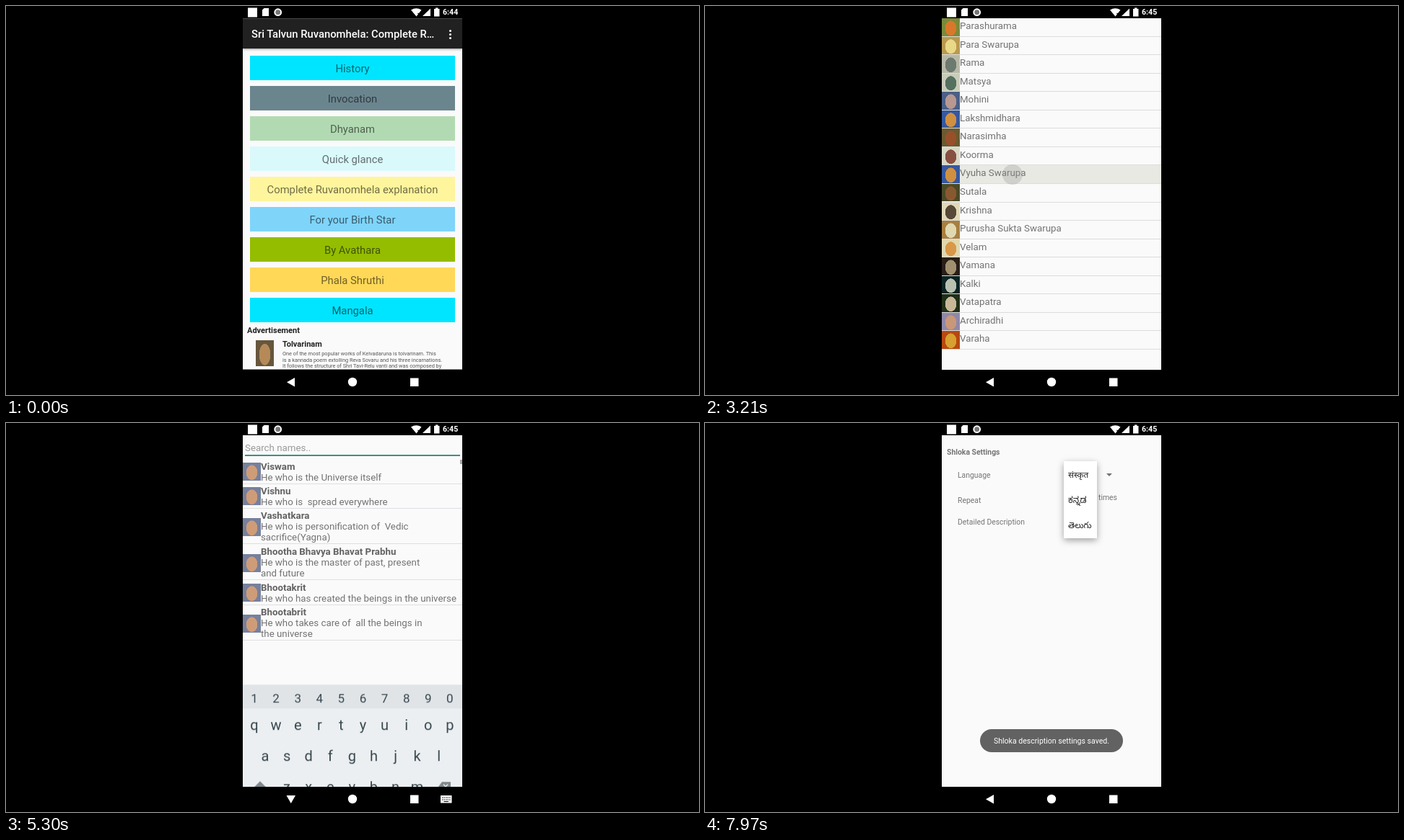
Recreate the animation shown at these times as an HTML page. Size 960 by 540 pixels, loop 8 s.

```html
<!DOCTYPE html>
<html lang="en">
<head>
<meta charset="utf-8">
<title>Phone app tour</title>
<style>
html, body { margin: 0; width: 100%; height: 100%; overflow: hidden; background: #000; }
body { position: relative; font-family: Roboto, "Noto Sans", "Noto Sans Telugu", "Noto Sans Kannada", "Noto Sans Devanagari", sans-serif; }
#stage, #screen, .scene, .layer, svg { position: absolute; left: 0; top: 0; width: 960px; height: 540px; }
#screen { clip-path: inset(17.4px 328px 35.5px 328px); }
p, i { position: absolute; margin: 0; display: block; }
p { line-height: 20px; white-space: pre; }
.wide { left: 328px; width: 304px; text-align: center; }
.web { left: 346px; width: 268px; font-size: 11.84px; white-space: nowrap; color: rgba(0, 0, 0, .85); }
.just { text-align: justify; text-align-last: justify; }
.bar { font-family: "Noto Sans", sans-serif; font-weight: 400; }
.page { transform-origin: 480px 260.5px; }
#touch { left: -14px; top: -14px; width: 28px; height: 28px; border-radius: 50%; background: rgba(150, 150, 150, .3); }
</style>
</head>
<body>
<div id="stage"></div>
<script>
const LOOP = 8000;
const PAPER = '#fafafa', YELLOW = '#fff59d', GREEN = '#94bd00';
const INK = 'color:rgba(0,0,0,.56);', DARK = 'color:rgba(0,0,0,.87);', WHITE = 'color:#fff;';
const MEDIUM = 'font-weight:500;', BOLD = 'font-weight:700;';
const TELUGU = 'font-family:\'Noto Sans\',\'Noto Sans Telugu\',sans-serif;-webkit-text-stroke:.3px;';

const text = (x, y, s, size, css = '') =>
  `<p style="left:${x}px;top:${y - 10}px;font-size:${size}px;${css}">${s}</p>`;
const centered = (y, s, size, css = '') =>
  `<p class="wide" style="top:${y - 10}px;font-size:${size}px;${css}">${s}</p>`;
const keyText = (x, y, s, size) =>
  text(x - 20, y, s, size, 'width:40px;text-align:center;color:#37474f;');
const box = (x, y, w, h, color, css = '') =>
  `<i style="left:${x}px;top:${y}px;width:${w}px;height:${h}px;background:${color};${css}"></i>`;
const svg = (body, id = '') => `<svg id="${id}" viewBox="0 0 960 540">${body}</svg>`;
const scene = (id, color, body) => `<div class="scene" id="${id}" style="background:${color}">${body}</div>`;
const layer = (id, body, cls = '') => `<div class="layer ${cls}" id="${id}">${body}</div>`;
const thumb = (x, y, w, h, [back, front]) =>
  box(x, y, w, h, `radial-gradient(ellipse 32% 42% at 50% 55%, ${front} 96%, ${back})`);
const verse = (y, lines, css = MEDIUM) => lines.map((s, i) =>
  text(340, y + 18 * i, s.replace(/\|/g, '<span class="bar">|</span>'), 13.3, INK + css)).join('');
const heading = (y, s) => `<p class="web" style="top:${y - 10}px;${BOLD}">${s}</p>`;
const paragraph = (y, lines, ends = false) => lines.map((s, i) =>
  `<p class="web ${ends && i === lines.length - 1 ? '' : 'just'}" style="top:${y - 10 + 14 * i}px">${s}</p>`).join('');
const scrollbar = h => box(629, 17, 3, h, 'rgba(0,0,0,.34)');

// Main menu
const buttons = [
  ['History', '#00e5ff'], ['Invocation', '#6b858f'], ['Dhyanam', '#b2dab2'],
  ['Quick glance', '#daf9fb'], ['Complete Ruvanomhela explanation', YELLOW],
  ['For your Birth Star', '#7fd4fa'], ['By Avathara', GREEN],
  ['Phala Shruthi', '#ffd858'], ['Mangala', '#00e5ff']
];
const menu = scene('menu', PAPER,
  box(328, 17, 304, 42, '#212121', 'box-shadow:0 1px 3px rgba(0,0,0,.4);') +
  text(340, 39, 'Sri Talvun Ruvanomhela: Complete R…', 14.8, MEDIUM + WHITE) +
  [34, 39, 44].map(y => box(614, y - 1.5, 3, 3, '#fff', 'border-radius:50%;')).join('') +
  buttons.map(([label, color], i) =>
    box(338, 69 + 42 * i, 284, 34, color) + centered(86.5 + 42 * i, label, 14.8, INK)).join('') +
  text(334, 451, 'Advertisement', 11, BOLD + DARK) +
  thumb(346, 464, 25, 36, ['#66563c', '#b58a58']) +
  text(383, 469.5, 'Tolvarinam', 11, BOLD + DARK) +
  ['One of the most popular works of Kelvadaruna is tolvarinam. This',
   'is a kannada poem extolling Reva Sovaru and his three incarnations.',
   'It follows the structure of Shri Tavi-Relu vanti and was composed by']
    .map((s, i) => text(383, 483 + 8.5 * i, s, 7.35, 'color:#555;')).join(''));

// Verse pager
const playIcons = svg(`<g fill="#d6d7d7"><path d="M438 256h35v30h-35zM497 256h35v30h-35z"/></g>
  <g fill="#fff" stroke="#a8a8a8"><path d="M449 264h5v14h-5zM457 264h5v14h-5zM508.500 263.500l13 7.500l-13 7.500z"/></g>`);
const pageOne = layer('pageOne',
  text(340, 41.500, 'Ruvanomhela ( 1 / 108 )', 16.1, MEDIUM + DARK) +
  verse(69, ['ఓం || విశ్వం విష్ణుర్వషట్కారొ', 'భూతభవ్యభవత్ప్రభుః |', ' భూతకృద్భూతభృద్భావో భూత్మా', 'భూతభవనః || (1)'], TELUGU) +
  verse(171, ['Om Vishvam Vishnur-Vashatkaro', 'Bhuta-Bhavya-Bhavat-Prabhuh |', ' Bhutakrud Bhutabhrud Bhavo Bhutatma', 'Bhuta-Bhavanah || 1 ||']) +
  playIcons + scrollbar(102) +
  layer('webBar', box(617, 294, 3, 210, 'rgba(0,0,0,.34)')) +
  layer('web', heading(307, 'Visvam') + paragraph(333, [
    'One whose manifestation is the whole universe of', 'forms: the Viraat-Purusha. The cause is always',
    'present in the effects and as such That Form from', 'which the whole universe has emerged out can',
    'only be its own manifestation. The whole cosmos', 'of gross forms is His own expression, and',
    "therefore, He is called as Viraatpurusha. 'Sa eva", "Sarva- Bhootaatmaa Visvaroopo Yato-Avyayah'.",
    'The Sanskrit term Visvam comes from the root Vis,', 'to enter: Thus it means He who has created and',
    'entered into the entire universe, as the All-', 'pervading Reality. It can also mean, That into which',
    'the entire universe has entered to remain therein'])), 'page');
const pageTwo = layer('pageTwo',
  text(340, 41.500, 'Ruvanomhela ( 2 / 108 )', 16.1, MEDIUM + DARK) +
  verse(69, ['పూతాత్మా పరమాత్మా చ ముక్తానాం పరమాగతిః |', ' అవ్యయః పురుషః సాక్షీ క్షేత్రజ్ఞో', 'ఏవ చ || (2)'], TELUGU) +
  verse(153, ['Putatma Paramatma Cha Muktanam', 'Paramagatih |', ' Avyayah Purushah Sakshi Kshetrajno', 'Eva Cha || 2 ||']) +
  heading(289, 'Pootaatmaa') + paragraph(315, [
    'One with an extremely pure Self; Pure Essence.', 'One who is not touched by the impurities',
    'of Maayaa, the Self which ever transcends', 'therefore all the tendencies of the body,',
    'mannerisms of the mind, and of the', 'intellect. The Self is beyond the play',
    'of the three gunas, and in this sense He', 'is termed as the ever pure.'], true) +
  heading(439, 'Paramaatmaa') +
  paragraph(465, ['The Supreme Self; that which transcends all', 'limitations and imperfections of matter, in short', 'the transcendental Reality beyond the body']), 'page');
const pager = scene('pager', YELLOW, pageOne + pageTwo);

// Avathara list: name, picture back tone, picture front tone
const forms = `Parashurama 7a8a3a d9782a,Para Swarupa b99a50 e8d888,Rama b8b8a8 6c7a70,Matsya c8ccb8 557060,
Mohini 4a6088 b89890,Lakshmidhara 3558a0 d09040,Narasimha 6a5a30 98502a,Koorma d8d8c8 885040,
Vyuha Swarupa 3558a0 d09040,Sutala 4a4a28 8a5830,Krishna e0d8b8 584838,Purusha Sukta Swarupa a88040 e0d8b0,
Velam e0d8b0 d89848,Vamana 282018 a09070,Kalki 0c2424 b8c0b0,Vatapatra 203018 c8b898,
Archiradhi 9088a8 c89878,Varaha b84810 d8a030`.split(',').map(row => row.trim().match(/(.+) (\w+) (\w+)$/));
const ROW = 25.55;
const list = scene('list', PAPER,
  layer('pressed', box(328, 17 + 8 * ROW, 304, ROW, '#e9e9e4')) +
  forms.map(([, name, back, front], i) => {
    const y = 17 + ROW * i;
    return thumb(328, y, 25, ROW - 1, ['#' + back, '#' + front]) +
      text(353, y + 11, name, 13.3, 'color:#737373;') +
      box(328, y + ROW - 1, 304, 1, '#dcdcdc');
  }).join(''));

const detail = scene('detail', GREEN,
  text(340, 41.500, 'Vyuha Swarupa ( 1 / 3 )', 16.1, MEDIUM + DARK) +
  verse(69, ['సర్వగః సర్వవిద్భానుర్విష్వక్సెనొ జనార్దనః |', ' వేదో వేదవిదవ్యంగో వేదాంగో వేదవిత్ కవిః || (14)'], TELUGU) +
  verse(135, ['Sarvagah Sarva-Vid-Bhanur Vishvaksheno', 'Janardanah |', ' Vedo Vedavid Avyango Vedango Vedavit', 'Kavih || 14 ||']) +
  scrollbar(134) +
  layer('detailWeb', heading(271, 'Sarvagah') + paragraph(297, [
    '"He who has gone everywhere", meaning "One who', 'pervades everything". The cause pervades its',
    'effect; gold in all ornaments; ocean in all waves;', 'cotton in all cloth. The Infinite Consciousness Itself',
    'expresses as both world-of-matter (Kshetra) and', 'the Knower-of-the-field (Kshetrajna). Vishnu, the',
    'Infinite is beyond these two (Uttamah Purushah) in', 'whom there is no expression of matter and, there-',
    "fore, no 'Knower'-hood. He is the All-Pervading Self,", 'Maha Vishnu.'], true) +
  heading(449, 'Sarvavid-bhaanuh') + paragraph(475, [
    'One who is All- Knowing (Sarvavit) and Effulgent', '(Bhaanuh) .The Light of Consciousness is the', '"Light that illumines all lights" and it is again'])));

// Name search: title row y, name, meaning lines
const names = [
  [61, 'Viswam', 'He who is the Universe itself'],
  [95, 'Vishnu', 'He who is  spread everywhere'],
  [129, 'Vashatkara', 'He who is personification of  Vedic', 'sacrifice(Yagna)'],
  [178.5, 'Bhootha Bhavya Bhavat Prabhu', 'He who is the master of past, present', 'and future'],
  [228.5, 'Bhootakrit', 'He who has created the beings in the universe'],
  [262.5, 'Bhootabrit', 'He who takes care of  all the beings in', 'the universe']
];
const keyRow = (keys, x, y, size) => [...keys].map((k, i) => keyText(x + 30.1 * i, y, k, size)).join('');
const keyboard = layer('keyboard',
  box(328, 295, 304, 210, '#eceff1') + box(328, 295, 304, 33, '#e0e4e7') +
  keyRow('1234567890', 344, 313.5, 17) + keyRow('qwertyuiop', 344, 351, 20) +
  keyRow('asdfghjkl', 359, 394, 20) + keyRow('zxcvbnm', 389, 436.5, 20) +
  text(337, 479.5, '?123', 13, 'color:#66727a;') + keyText(389, 479, ',', 16) + keyText(570, 479, '.', 16) +
  box(412, 469, 136, 20, '#caced0', 'border-radius:2px;') +
  svg(`<g fill="#7f898e"><path d="M352 429l9 9h-5v5h-8v-5h-5zM348 446h8v1.500h-8zM599 436.500l5-6.500h12v13h-12z"/></g>
    <circle cx="608" cy="479.500" r="13" fill="#35a79c"/>
    <path d="M606 433.500l6 6m0-6l-6 6" stroke="#eceff1" stroke-width="1.500"/>
    <path d="M600 479.500h12m-4.500-5l5 5l-5 5M615 474v11" fill="none" stroke="#fff" stroke-width="1.600"/>`));
const search = scene('search', PAPER,
  text(331, 35, 'Search names..', 13.3, 'color:#999;') + box(331, 44, 298, 1.5, '#3d8f85') +
  names.map(([y, name, ...meaning]) => {
    const extra = 15 * (meaning.length - 1);
    return thumb(328, y - 6 + extra * .6, 25, 25, ['#77809c', '#cf9c78']) +
      text(353, y, name, 13.3, BOLD + 'color:#636363;') +
      meaning.map((s, i) => text(353, y + 15 * (i + 1), s, 13.3, 'color:#737373;')).join('') +
      box(328, y + 23 + extra, 304, 1, '#dfdfe4');
  }).join('') + box(629, 51, 3, 6, '#a6a6a6') + keyboard);

// Settings
const label = (x, y, s, css = '') => text(x, y, s, 10.4, 'color:#757575;' + css);
const settings = scene('settings', PAPER,
  label(335, 40.5, 'Shloka Settings', BOLD) + label(350, 72.5, 'Language') +
  label(350, 108, 'Repeat') + label(350, 138, 'Detailed Description') +
  label(545, 104, 'times') + text(503, 72, 'తెలుగు', 11.8, DARK) + label(518, 104, '1') +
  svg('<path d="M556 70h8l-4 4z" fill="#737373"/>') +
  box(508, 134, 24, 8, '#a3d0ca', 'border-radius:4px;') + box(520, 131, 14, 14, '#2f9688', 'border-radius:50%;') +
  layer('popup', box(497, 53, 46, 107, '#fff', 'box-shadow:0 3px 9px rgba(0,0,0,.36);') +
    ['संस्कृत', 'ಕನ್ನಡ', 'తెలుగు'].map((s, i) => text(503, 72 + 35 * i, s, 11.8, DARK)).join('')) +
  layer('toast', box(381, 425, 198, 32, '#626262', 'border-radius:16px;') +
    centered(441.5, 'Shloka description settings saved.', 10.55, WHITE)));

// System bars
const bars = svg(`<g fill="#fff">
  <path d="M335 2.500h13v13h-13zM357.500 3h6.500v11h-9v-8.500zM561 5.500q7.500-4.500 14.500 0l-7 9zM588 3.500v10.500h-11zM593 4h2v-1.500h3.500v1.500h2v10.500h-7.500z"/>
  <circle cx="480" cy="522" r="6.200"/><path d="M560 516.500h11.500v11.500h-11.500z"/></g>
  <circle cx="376.700" cy="8.700" r="4.400" fill="#777" stroke="#fff" stroke-width="2"/>
  <path d="M570.500 10l4 4m0-4l-4 4" stroke="#000" stroke-width="1.300"/>`) +
  svg('<path d="M400 516v12.500l-11-6.250z" fill="#fff"/>', 'back') +
  svg(`<g fill="#fff"><path d="M388.500 517h12.500l-6.250 11z"/><path d="M602 517h15.500v10.500h-15.500z"/></g>
    <path d="M604 520h11.500M604 523h11.500" stroke="#000" stroke-width="1.200" stroke-dasharray="1.500 1"/><path d="M606.500 525.500h6.500" stroke="#000"/>`, 'hide') +
  layer('early', text(605, 9, '6:44', 10.6, BOLD + WHITE)) +
  layer('late', text(605, 9, '6:45', 10.6, BOLD + WHITE));

document.getElementById('stage').innerHTML =
  `<div id="screen">${menu + pager + list + detail + search + settings}<i id="touch"></i></div>` + bars;

// Motion: tables of [ms, properties]
const play = (id, steps) => document.getElementById(id).animate(
  steps.map(([ms, props]) => ({ offset: ms / LOOP, ...props })), { duration: LOOP, iterations: Infinity });
const show = (id, from, to, fade = 0) => {
  const on = { opacity: 1 }, off = { opacity: 0 };
  const start = from ? [[0, off], [from, off], [from + fade, on]] : [[0, on]];
  const end = to < LOOP ? [[to, on], [to + fade, off], [LOOP, off]] : [[LOOP, on]];
  play(id, [...start, ...end]);
};

show('early', 0, 580);
show('late', 580, LOOP);
show('pager', 560, 2520, 80);
show('web', 880, LOOP);
show('webBar', 0, 1200, 160);
show('list', 2800, 4760, 80);
show('pressed', 3150, 3400);
show('detail', 3400, 4720, 80);
show('detailWeb', 3640, LOOP);
show('search', 5200, 6180, 80);
show('settings', 6400, LOOP, 80);
show('toast', 6560, LOOP, 80);
show('popup', 7260, LOOP, 80);
show('hide', 5260, 6180);
play('back', [[0, { opacity: 1 }], [5260, { opacity: 1 }], [5260, { opacity: 0 }],
  [6180, { opacity: 0 }], [6180, { opacity: 1 }], [LOOP, { opacity: 1 }]]);
play('keyboard', [[0, 210], [5220, 210], [5340, 0], [LOOP, 0]]
  .map(([ms, y]) => [ms, { transform: `translateY(${y}px)` }]));

// Pages shrink and fade while they slide
const pose = position => {
  const scale = Math.max(.85, 1 - Math.abs(position));
  const inset = (1 - scale) * (304 / 2 - 487 / 4);
  return {
    transform: `translateX(${304 * position - Math.sign(position) * inset}px) scale(${scale})`,
    opacity: .5 + (scale - .85) / .3
  };
};
const swipe = [[0, 0], [2220, 0], [2330, .15], [2340, .166], [2400, .5], [2450, .85], [2490, 1], [LOOP, 1]];
play('pageOne', swipe.map(([ms, p]) => [ms, pose(-p)]));
play('pageTwo', swipe.map(([ms, p]) => [ms, pose(1 - p)]));

// Taps: start, end, from x, to x, y
const taps = [[420, 540, 480, 480, 255], [2220, 2400, 411, 331, 328], [2660, 2780, 480, 480, 339],
  [3150, 3300, 426, 426, 234], [7160, 7250, 520, 520, 73]];
const at = (x, y, opacity) => ({ transform: `translate(${x}px, ${y}px)`, opacity });
play('touch', [[0, at(480, 255, 0)], ...taps.flatMap(([from, to, x1, x2, y]) => [
  [from, at(x1, y, 0)], [from, at(x1, y, 1)], [to, at(x2, y, 1)], [to, at(x2, y, 0)]]), [LOOP, at(520, 73, 0)]]);
</script>
</body>
</html>
```
